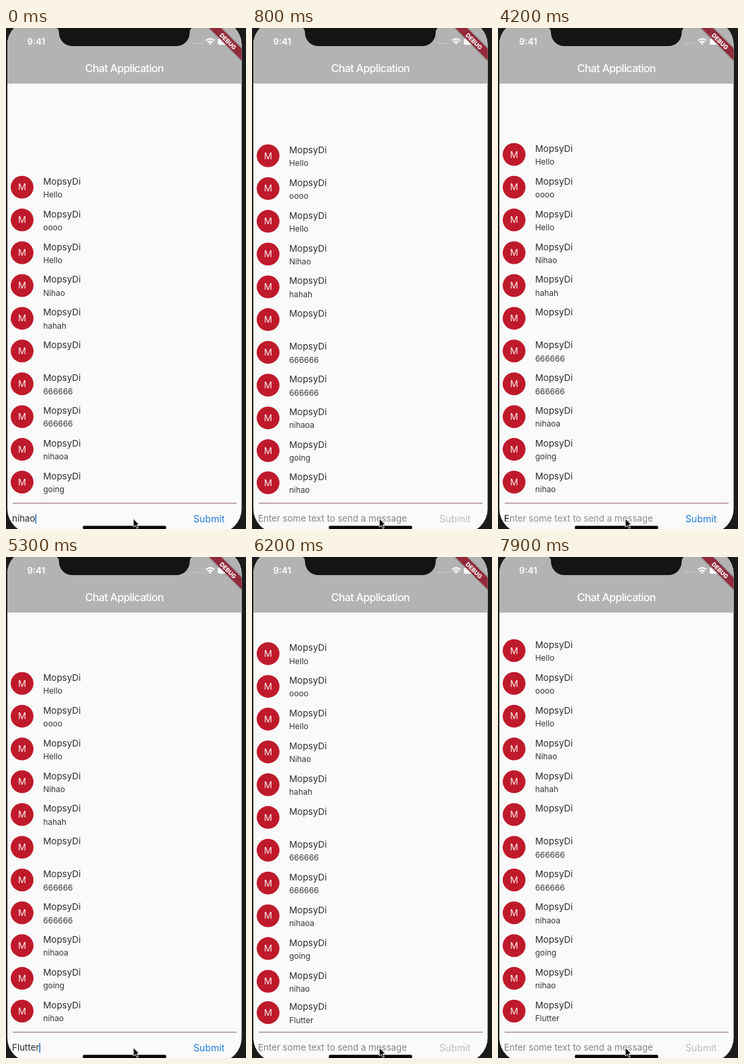
Animation, 358 px wide and 748 px high, one loop 8 s. Source, as an HTML page:

```html
<!DOCTYPE html>
<html lang="en">
<head>
<meta charset="utf-8">
<title>Chat Application</title>
<style>
  html, body { margin: 0; width: 100%; height: 100%; overflow: hidden; background: #1b1b1b; }
  svg { display: block; width: 358px; height: 748px; font-family: Inter, Roboto, sans-serif; }
  .initial { font-size: 13.4px; fill: #f8eeee; text-anchor: middle; }
  .name { font-size: 13.4px; fill: #2c2c2c; }
  .body { font-size: 11.9px; fill: #363636; }
  .field { font-size: 13.4px; white-space: pre; }
</style>
</head>
<body>
<svg viewBox="0 0 358 748">
  <defs>
    <clipPath id="screen"><rect x="2" y="-11" width="349.5" height="765" rx="36"/></clipPath>
  </defs>
  <rect width="358" height="748" fill="#1b1b1b"/>
  <g clip-path="url(#screen)">
    <rect width="358" height="748" fill="#fafafa"/>
    <g id="list"></g>

    <rect width="358" height="83" fill="#b3b3b3"/>
    <text x="176.5" y="66" font-size="16" font-weight="500" letter-spacing="-.6" fill="#fff" text-anchor="middle">Chat Application</text>
    <text x="31.5" y="25" font-size="13.4" font-weight="600" fill="#fff">9:41</text>

    <g fill="#d2d2d2">
      <circle cx="279" cy="23" r="1.1"/><circle cx="283.3" cy="23" r="1.1"/>
      <circle cx="287.6" cy="23" r="1.1"/><circle cx="291.9" cy="23" r="1.1"/>
    </g>
    <g fill="none" stroke="#fff" stroke-width="2">
      <path d="M298.3 18.8Q304.5 13.4 310.7 18.8M300.8 21.5Q304.5 18.2 308.2 21.5"/>
      <path d="M302.4 22.8Q304.5 21.2 306.6 22.8L304.5 25Z" fill="#fff" stroke="none"/>
    </g>
    <rect x="316" y="15.5" width="19" height="9.5" rx="2.5" fill="#fff"/>
    <rect x="336" y="18.5" width="1.5" height="3.5" rx=".7" fill="#e5e5e5"/>

    <path d="M300 -12L364 52" stroke="#000" stroke-opacity=".12" stroke-width="16"/>
    <path d="M300 -12L364 52" stroke="#922a3b" stroke-width="12.5"/>
    <text transform="translate(331 20) rotate(45)" y="3.1" font-size="8.8" font-weight="800" fill="#fff" text-anchor="middle">DEBUG</text>

    <path d="M10 709.5H344" stroke="#a98c92" stroke-width="1.6"/>
    <text id="hint" class="field" x="9" y="737" fill="#858585">Enter some text to send a message</text>
    <text id="typed" class="field" x="9" y="737" fill="#2c2c2c"></text>
    <rect id="caret" y="726" width="1.6" height="14" fill="#3273d0"/>
    <text id="submit" x="279.5" y="738" font-size="14.2">Submit</text>
    <rect x="114.5" y="743.3" width="124.5" height="5" rx="2.2" fill="#080808"/>
  </g>
  <path d="M73 -1Q79 0 79 7A20 20 0 0 0 99 27H254A20 20 0 0 0 274 7Q274 0 280 -1Z" fill="#141414"/>
  <path d="M190 732.5V745.2L193 742.6L195.2 747.2L197.3 746.2L195.2 741.7H199Z" fill="#080808" stroke="#fff" stroke-width=".9"/>
</svg>

<script>
const LOOP = 8000, TICK = 100;
const ROW = 48.93, LIST_BOTTOM = 702.5;
const GROW = 800, FADE = 200;
const SENDS = [127, 5596];
const TYPE_START = 4170, KEY_GAP = 180;
const USER = "MopsyDi";
const MESSAGES = ["Hello", "oooo", "Hello", "Nihao", "hahah", "", "666666", "666666", "nihaoa", "going", "nihao", "Flutter"];

const $ = id => document.getElementById(id);
const clamp = v => Math.min(1, Math.max(0, v));

// CSS-style cubic bezier, solved for x by bisection
function bezier(x1, y1, x2, y2) {
  const at = (a, b, u) => 3 * a * u * (1 - u) ** 2 + 3 * b * u * u * (1 - u) + u ** 3;
  return x => {
    if (x <= 0 || x >= 1) return clamp(x);
    let lo = 0, hi = 1;
    for (let i = 0; i < 24; i++) {
      const mid = (lo + hi) / 2;
      if (at(x1, x2, mid) < x) lo = mid; else hi = mid;
    }
    return at(y1, y2, lo);
  };
}
const easeOut = bezier(0, 0, .58, 1);
const fastOutSlowIn = bezier(.4, 0, .2, 1);

$("list").innerHTML = MESSAGES.map((text, i) => `
  <clipPath id="clip${i}"><rect width="358"/></clipPath>
  <g clip-path="url(#clip${i})">
    <circle cx="24" r="17" fill="#bf1a2b"/>
    <text class="initial" x="24" y="4.8">${USER[0]}</text>
    <text class="name" x="55.5" y="-4">${USER}</text>
    <text class="body" x="55.5" y="15.3">${text}</text>
  </g>`).join("");
const rows = [...$("list").querySelectorAll("g")];
const clips = [...$("list").querySelectorAll("rect")];

function layoutRows(t) {
  const firstNew = MESSAGES.length - SENDS.length;
  let bottom = LIST_BOTTOM;
  for (let i = MESSAGES.length - 1; i >= 0; i--) {
    const size = i < firstNew ? 1 : easeOut((t - SENDS[i - firstNew]) / GROW);
    const height = ROW * size;
    rows[i].setAttribute("transform", `translate(0 ${bottom - height / 2})`);
    clips[i].setAttribute("y", -height / 2);
    clips[i].setAttribute("height", height);
    bottom -= height;
  }
}

function inputText(t) {
  if (t < SENDS[0]) return "nihao";
  if (t < TYPE_START || t >= SENDS[1]) return "";
  return "Flutter".slice(0, 1 + Math.floor((t - TYPE_START) / KEY_GAP));
}

function hintOpacity(t) {
  const fade = start => fastOutSlowIn((t - start) / FADE);
  return fade(SENDS[0]) - fade(TYPE_START) + fade(SENDS[1]);
}

function render(t) {
  layoutRows(t);
  const text = inputText(t);
  $("typed").textContent = text;
  $("hint").setAttribute("opacity", hintOpacity(t));
  $("submit").setAttribute("fill", text ? "#1f7ddb" : "#bdbdbd");
  $("caret").setAttribute("x", 9 + (text ? $("typed").getComputedTextLength() : 0));
  $("caret").setAttribute("opacity", text.length > 1 ? 1 : 0);
}

let start;
function frame(now) {
  start ??= now;
  const t = (now - start) % LOOP;
  render(Math.floor(t / TICK) * TICK);
  requestAnimationFrame(frame);
}
render(0);
requestAnimationFrame(frame);
</script>
</body>
</html>
```
